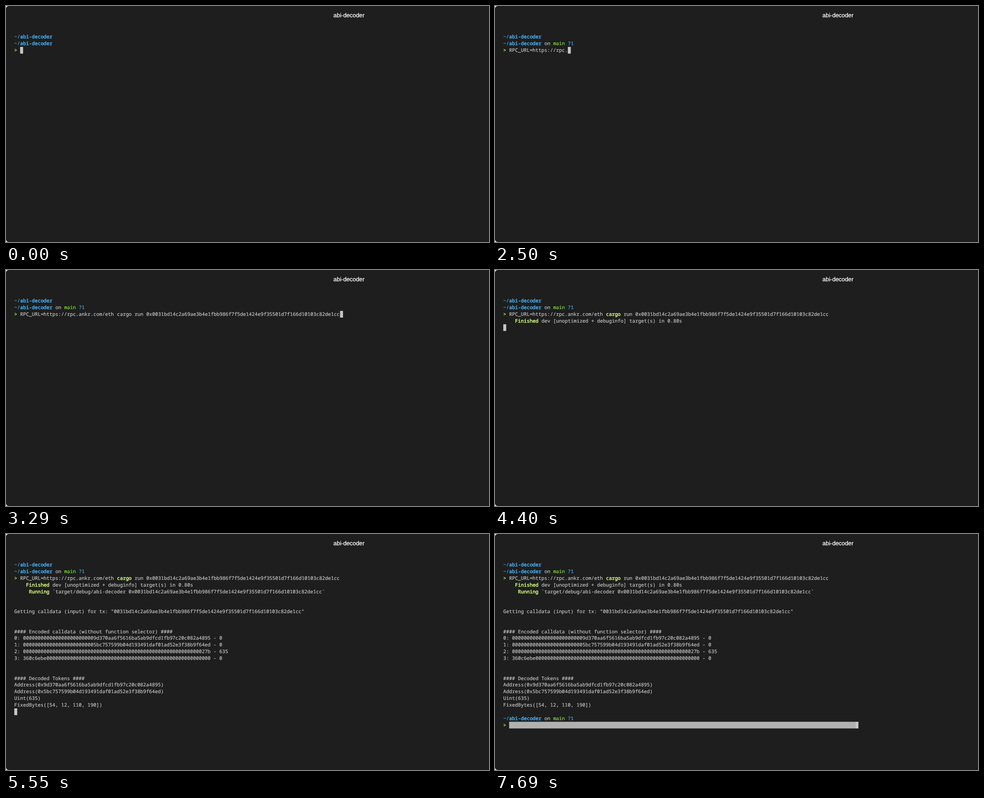
An HTML page with a canvas that plays this animation: 1068 by 525 pixels, repeating every 8 s.

```html
<!DOCTYPE html>
<html lang="en">
<head>
<meta charset="utf-8">
<title>abi-decoder</title>
<style>
  html, body { margin: 0; width: 100%; height: 100%; overflow: hidden; background: #fff; }
  canvas { display: block; width: 1068px; height: 525px; }
</style>
</head>
<body>
<canvas id="stage" width="1068" height="525"></canvas>
<script>
const ctx = document.getElementById('stage').getContext('2d');

const LOOP = 8000;
const CELL = 6.49, LINE = 14.85, LEFT = 18.3, TOP = 61.3;
const MONO = `${CELL / 0.6}px "Noto Sans Mono", "DejaVu Sans Mono", monospace`;
const REGULAR = 0.2, BOLD = 0.55;
const COLOR = {
  back: '#1e1e1e', text: '#c7c7c7', cursor: '#c7c7c7', paste: '#b1b1b1',
  blue: '#48b0f5', green: '#7fe63c', bright: '#d0f77c'
};

const HASH = '0031bd14c2a69ae3b4e1fbb986f7f5de1424e9f35501d7f166d10103c82de1cc';
const FROM = '9d370aa6f5616ba5ab9dfcd1fb97c20c082a4895';
const TO = '5bc757599b04d193491daf01ad52e3f38b9f64ed';
const ENV = 'RPC_URL=https://rpc.ankr.com/eth ';
const COMMAND = `${ENV}cargo run 0x${HASH}`;
const PARTIAL = 20;

const OUTPUT = [
  '#### Encoded calldata (without function selector) ####',
  `0: ${FROM.padStart(64, '0')} - 0`,
  `1: ${TO.padStart(64, '0')} - 0`,
  `2: ${'27b'.padStart(64, '0')} - 635`,
  `3: ${'360c6ebe'.padEnd(64, '0')} - 0`,
  '', '',
  '#### Decoded Tokens ####',
  `Address(0x${FROM})`,
  `Address(0x${TO})`,
  'Uint(635)',
  'FixedBytes([54, 12, 110, 190])'
];

const cellX = col => LEFT + col * CELL;
const rowY = row => TOP + row * LINE;

// A thin outline gives the text its weight, as a terminal's synthetic bold does.
function inkText(text, x, y, color, weight) {
  ctx.fillStyle = ctx.strokeStyle = color;
  ctx.lineWidth = weight;
  ctx.fillText(text, x, y);
  ctx.strokeText(text, x, y);
}

function print(row, col, text, color = COLOR.text, weight = REGULAR) {
  ctx.font = MONO;
  inkText(text, cellX(col), rowY(row) + 10.8, color, weight);
}

function block(row, col, count, color) {
  ctx.fillStyle = color;
  ctx.fillRect(cellX(col), rowY(row), count * CELL, LINE);
}

const cursor = (row, col) => block(row, col, 1, COLOR.cursor);
const arrow = row => print(row, 0, '>', COLOR.green, BOLD);

function pasted(row, count) {
  block(row, 2, count, COLOR.paste);
  cursor(row, 2 + count);
}

function folder(row) {
  print(row, 0, '~/', COLOR.blue);
  print(row, 2, 'abi-decoder', COLOR.blue, BOLD);
}

function gitStatus(row) {
  print(row, 14, 'on');
  print(row, 17, 'main', COLOR.green);
  print(row, 22, '?1', COLOR.blue);
}

function commandLine(t) {
  arrow(2);
  if (t < 2500) return cursor(2, 2);
  if (t < 2600) {
    print(2, 2, COMMAND.slice(0, PARTIAL));
    return cursor(2, 2 + PARTIAL);
  }
  if (t < 3290) return pasted(2, COMMAND.length);

  const word = ENV.length;
  const running = t >= 3390;
  print(2, 2, ENV);
  print(2, 2 + word, 'cargo', running ? COLOR.bright : COLOR.text, running ? BOLD : REGULAR);
  print(2, 7 + word, COMMAND.slice(word + 5));
  if (t < 3490) cursor(2, 2 + COMMAND.length);
  else if (t < 4400) cursor(3, 0);
}

function programOutput(t) {
  if (t < 4400) return;
  print(3, 4, 'Finished', COLOR.bright, BOLD);
  print(3, 13, 'dev [unoptimized + debuginfo] target(s) in 0.80s');
  if (t < 4420) return cursor(4, 0);

  print(4, 5, 'Running', COLOR.bright, BOLD);
  print(4, 13, '`target/debug/abi-decoder 0x' + HASH + '`');
  if (t < 5180) return cursor(5, 0);

  print(7, 0, `Getting calldata (input) for tx: "${HASH}"`);
  if (t < 5550) return cursor(10, 0);

  OUTPUT.forEach((line, i) => print(10 + i, 0, line));
  if (t < 5690) return cursor(22, 0);

  folder(23);
  gitStatus(23);
  arrow(24);
  if (t < 7690) cursor(24, 2);
  else pasted(24, 118);
}

function windowFrame() {
  ctx.fillStyle = '#fff';
  ctx.fillRect(0, 0, 1068, 525);
  ctx.fillStyle = COLOR.back;
  ctx.beginPath();
  ctx.roundRect(0, 0, 1068, 525, [6, 0, 0, 6]);
  ctx.fill();

  ctx.font = '13px "Liberation Sans", Arial, sans-serif';
  ctx.textAlign = 'center';
  inkText('abi-decoder', 758.3, 25.3, '#fff', 0.3);
  ctx.textAlign = 'left';
}

function draw(now) {
  const t = now % LOOP;
  ctx.textRendering = 'geometricPrecision';
  ctx.lineJoin = 'round';
  windowFrame();
  folder(0);
  folder(1);
  if (t >= 500) gitStatus(1);
  commandLine(t);
  programOutput(t);
}

const start = performance.now();
function tick() {
  draw(performance.now() - start);
  requestAnimationFrame(tick);
}
tick();
</script>
</body>
</html>
```
